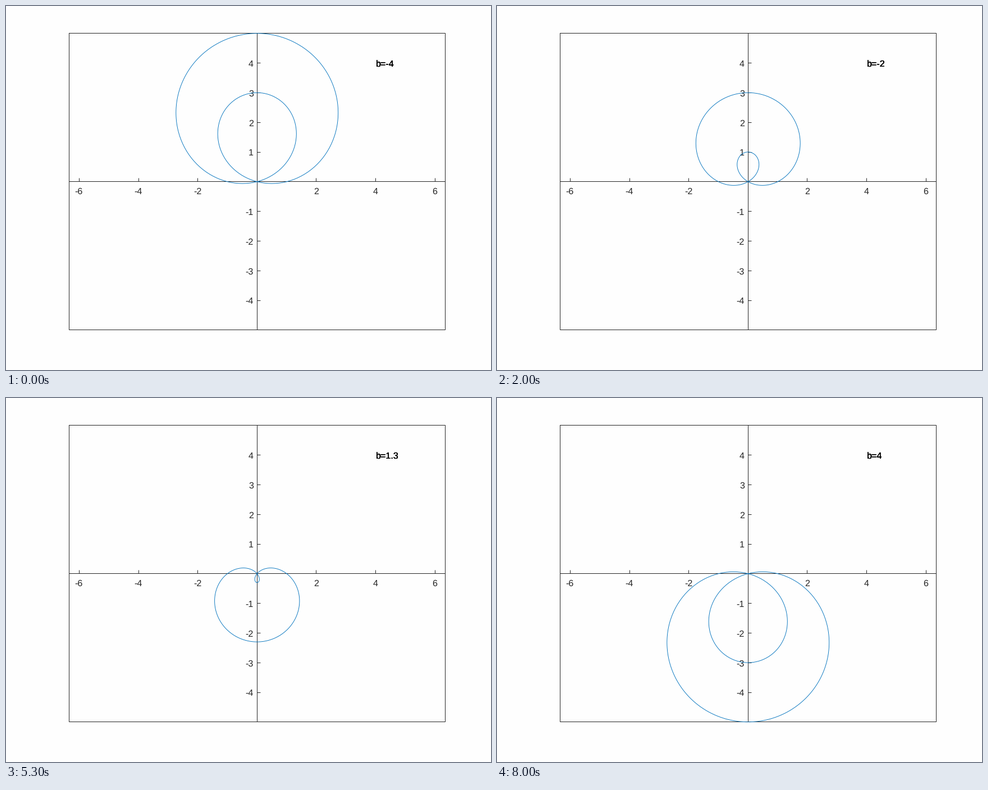
Recreate the animation shown at these times as a matplotlib script. Size 864 by 648 pixels, loop 8.1 s.

```python
import numpy as np
import matplotlib.pyplot as plt
from matplotlib.animation import FuncAnimation

W, H, DPI = 864, 648, 100
LEFT, RIGHT, TOP, BOTTOM = 112.5, 782.5, 48.5, 576.5
CX, CY, UNIT = 447.25, 312.72, 52.8
AXIS_X, AXIS_Y = 447.5, 312.5
GRAY, BLUE = "#262626", "#0072bd"
PX = 72 / DPI
HOLDS = {3, 8, 13, 42, 47, 52, 57}  # steps where the picture stands still

plt.rcParams["font.family"] = "Liberation Sans"
plt.rcParams["font.size"] = 16.1 * PX
plt.rcParams["text.hinting"] = "none"
plt.rcParams["toolbar"] = "None"

fig = plt.figure(figsize=(W / DPI, H / DPI), dpi=DPI, facecolor="#fefefe")
ax = fig.add_axes([0, 0, 1, 1])
ax.set_xlim(0, W)
ax.set_ylim(H, 0)
ax.axis("off")


def px(x):
    return CX + UNIT * x


def py(y):
    return CY - UNIT * y


def crisp(p):
    """Centre of the pixel that a thin line falls on."""
    return np.floor(p + 0.1) + 0.5


def stroke(xs, ys):
    # Coordinates already sit on pixel centres, so snapping stays off
    ax.plot(xs, ys, color=GRAY, lw=PX, snap=False, solid_capstyle="butt",
            solid_joinstyle="miter", zorder=1)


def label(x, y, text, align, color=GRAY):
    return ax.text(x, y, text, ha=align, va="baseline", color=color, zorder=2)


# Frame and the two axes through the origin
stroke([LEFT, RIGHT, RIGHT, LEFT, LEFT], [TOP, TOP, BOTTOM, BOTTOM, TOP])
stroke([LEFT, RIGHT], [AXIS_Y, AXIS_Y])
stroke([AXIS_X, AXIS_X], [TOP, BOTTOM])

for v in (-6, -4, -2, 2, 4, 6):
    x = crisp(px(v))
    stroke([x, x], [AXIS_Y, AXIS_Y - 6])
    label(px(v) - 0.5, 335, str(v), "center")

for v in (-4, -3, -2, -1, 1, 2, 3, 4):
    y = crisp(py(v))
    stroke([AXIS_X, AXIS_X + 6], [y, y])
    label(441, round(py(v) + 6.5), str(v), "right")

theta = np.linspace(0, 2 * np.pi, 401)
curve, = ax.plot([], [], color=BLUE, lw=0.9 * PX, snap=False, zorder=3)
# The caption is printed several times over itself, which hardens its edges
captions = [label(659, 108, "", "left", "black") for _ in range(4)]


def update(i):
    step = i - 1 if i in HOLDS else i
    b = (step - 40) / 10
    r = 1 - b * np.sin(theta)
    curve.set_data(px(r * np.cos(theta)), py(r * np.sin(theta)))
    for caption in captions:
        caption.set_text(f"b={b:g}")
    return curve, *captions


anim = FuncAnimation(fig, update, frames=81, interval=100,
                     repeat=True, repeat_delay=0, init_func=lambda: update(0))
plt.show()
```
